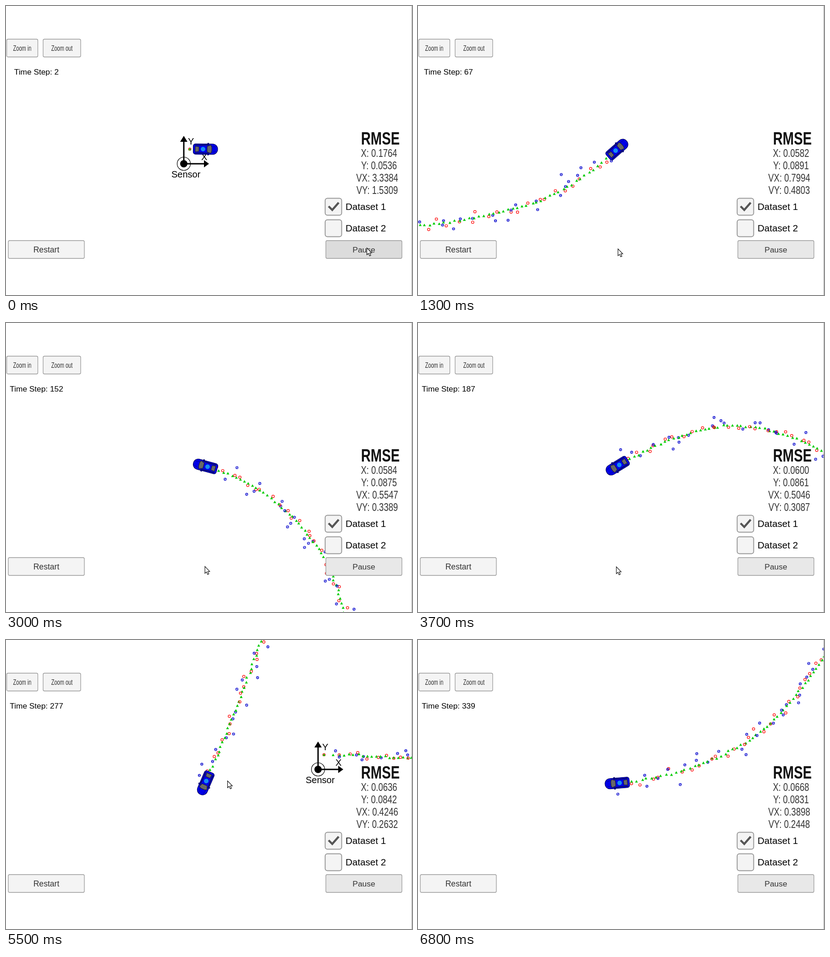
Animation of 886 by 632 pixels, one loop 6.9 s. Source, as an HTML page with a canvas:

```html
<!DOCTYPE html>
<html lang="en">
<head>
<meta charset="utf-8">
<title>Sensor fusion tracking</title>
<style>
html, body { margin: 0; width: 886px; height: 632px; overflow: hidden; background: #fff; }
canvas { display: block; }
</style>
</head>
<body>
<canvas id="stage" width="886" height="632"></canvas>
<script>
const ctx = document.getElementById('stage').getContext('2d');
const FRAMES = 69, FRAME_MS = 100, CENTER = [435, 313];

// Bends of the figure eight: [step, x, y] relative to the sensor.
const path = [
  [0, 13, -32], [2, 47, -32], [24, 265, -28], [44, 478, -67], [56, 595, -118],
  [67, 695, -195], [80, 782, -285], [95, 844, -428], [109, 843, -575], [125, 770, -726],
  [145, 613, -850], [164, 424, -884], [191, 169, -775], [215, 0, -583], [227, -57, -465],
  [246, -123, -280], [277, -246, 30], [287, -294, 121], [306, -420, 271], [323, -572, 353],
  [339, -740, 389], [350, -855, 385]
];
const cursorPath = [
  [0, 787, 529], [7, 600, 588], [10, 436, 531], [51, 431, 534], [55, 483, 308], [61, 640, -30]
];
// [step, X, Y, VX, VY]; errors fall roughly as powers of the step count.
const errors = [
  [2, .1764, .0536, 3.3384, 1.5309], [67, .0582, .0891, .7994, .4803],
  [227, .0613, .0851, .4626, .2840], [339, .0668, .0831, .3898, .2448]
].map(row => row.map(Math.log));

// Cubic interpolation through rows; eased rows come to rest at each key.
function sample(rows, t, eased) {
  const last = rows.length - 1;
  let k = 0;
  while (k < last - 1 && t >= rows[k + 1][0]) k++;
  const a = rows[k], b = rows[k + 1], span = b[0] - a[0];
  const u = Math.min(1, Math.max(0, (t - a[0]) / span));
  const slope = (i, c) => {
    const p = rows[Math.max(0, i - 1)], n = rows[Math.min(last, i + 1)];
    return eased ? 0 : (n[c] - p[c]) / (n[0] - p[0]) * span;
  };
  const rest = u * u * (3 - 2 * u);
  return a.slice(1).map((v, i) => v + (b[i + 1] - v) * rest
    + slope(k, i + 1) * u * (1 - u) ** 2 - slope(k + 1, i + 1) * u * u * (1 - u));
}

function heading(step) {
  const [x0, y0] = sample(path, step - 3), [x1, y1] = sample(path, step + 3);
  return Math.atan2(y1 - y0, x1 - x0);
}

let seed = 41;
function random() {
  seed = (seed * 1664525 + 1013904223) >>> 0;
  return (seed + 1) / 4294967297;
}
const gauss = s => s * Math.sqrt(-2 * Math.log(random())) * Math.cos(2 * Math.PI * random());

// Laser and radar readings alternate; every step also leaves an estimate.
const marks = Array.from({ length: 340 }, (_, i) => {
  const [x, y] = sample(path, i);
  const wobble = Math.min(i, 1.2);
  const estimate = [x + gauss(wobble), y + gauss(wobble)];
  if (i % 2 === 0) {
    const spread = Math.min(i, 5.5);
    return { estimate, reading: [x + gauss(spread), y + gauss(spread)] };
  }
  const range = Math.hypot(x, y) + gauss(14), angle = Math.atan2(y, x) + gauss(.024);
  return { estimate, angle, reading: [range * Math.cos(angle), range * Math.sin(angle)] };
});

function paint(fill, stroke, width = 1) {
  if (fill) { ctx.fillStyle = fill; ctx.fill(); }
  if (stroke) { ctx.strokeStyle = stroke; ctx.lineWidth = width; ctx.stroke(); }
}
function poly(points, fill, ...stroke) {
  ctx.beginPath();
  points.forEach(p => ctx.lineTo(...p));
  if (fill) ctx.closePath();
  paint(fill, ...stroke);
}
function circle(x, y, r, ...style) {
  ctx.beginPath();
  ctx.arc(x, y, r, 0, 7);
  paint(...style);
}
function box(x, y, w, h, r, ...style) {
  ctx.beginPath();
  ctx.roundRect(x, y, w, h, r);
  paint(...style);
}
function text(str, x, y, size, { align = 'center', color = '#000', squeeze = 1, weight = '' } = {}) {
  ctx.save();
  ctx.translate(x, y);
  ctx.scale(squeeze, 1);
  ctx.font = `${weight} ${size}px "Liberation Sans", Arial, sans-serif`;
  ctx.textAlign = align;
  ctx.fillStyle = color;
  ctx.fillText(str, 0, 0);
  ctx.restore();
}

function drawSensor() {
  const black = '#000', left = { align: 'left' };
  circle(0, 0, 14.5, null, black, 1.2);
  poly([[0, -50], [0, 0], [46, 0]], null, black, 3);
  poly([[0, -61], [8, -48], [-8, -48]], black);
  poly([[55, 0], [44, -8], [44, 8]], black);
  circle(0, 0, 8, black);
  text('Y', 9, -42, 20, left);
  text('X', 38, -8, 20, left);
  text('Sensor', -27, 30, 20, left);
}

function drawMark({ estimate: [ex, ey], reading: [x, y], angle }) {
  if (angle === undefined) {
    circle(x, y, 2.7, null, '#f00', 1.2);
  } else {
    const dx = 2 * Math.cos(angle), dy = 2 * Math.sin(angle);
    circle(x, y, 2.5, null, '#00c', 1.2);
    poly([[x - dx, y - dy], [x + dx, y + dy]], null, '#00c');
  }
  poly([[ex, ey - 3], [ex + 3.1, ey + 2.6], [ex - 3.1, ey + 2.6]], '#0c0');
}

function drawCar(angle) {
  const glass = ['#686868', '#222'];
  ctx.save();
  ctx.translate(...CENTER);
  ctx.rotate(angle);
  for (const side of [-1, 1]) {
    poly([[4, side * 11], [5, side * 14], [8, side * 13], [8, side * 11]], '#00007a');
  }
  box(-26.5, -11.5, 53.5, 23, [5, 11, 11, 5], '#0000e6', '#000050');
  for (const side of [-1, 1]) {
    poly([[-23, side * 9], [-10, side * 8.5], [8, side * 9.5]], null, '#101030', 1.5);
    poly([[14, side * 7], [24, side * 5]], null, '#00009a');
  }
  poly([[4, -6], [12, -9], [14, -4], [14, 4], [12, 9], [4, 6]], ...glass);
  poly([[-22, -6], [-14, -5], [-14, 5], [-22, 6]], ...glass);
  circle(-5, 0, 5, '#168cf0');
  ctx.restore();
}

function drawButton(label, x, y, w, size, squeeze = 1, fill = '#f4f4f4') {
  box(x + .5, y + .5, w - 1, 39, 3, fill, '#999', 1.3);
  text(label, x + w / 2, y + 20 + size * .36, size, { color: '#333', squeeze });
}

function drawPanel(step, pressed) {
  drawButton('Zoom in', 1, 72, 69, 16, .69);
  drawButton('Zoom out', 80.5, 72, 83, 16, .69);
  drawButton('Restart', 4.5, 512.5, 167, 17.6);
  drawButton('Pause', 697.5, 512.5, 167, 17.4, 1, pressed ? '#dcdcdc' : '#e8e8e8');
  text('Time Step: ' + step, 66.5, 150, 17.3);

  for (const i of [0, 1]) {
    const y = 420 + 47 * i;
    box(696.5, y + .5, 36, 37, 5, '#f4f4f4', '#999', 2);
    text('Dataset ' + (i + 1), 741, y + 25.5, 20.6, { align: 'left' });
  }
  poly([[704, 438], [712, 446], [726, 430]], null, '#555', 4.5);

  text('RMSE', 817, 303, 38, { weight: 'bold', squeeze: .77, color: '#111' });
  const values = sample(errors, Math.log(step)).map(Math.exp);
  ['X', 'Y', 'VX', 'VY'].forEach((name, i) => {
    text(`${name}: ${values[i].toFixed(4)}`, i < 2 ? 814 : 810, 330 + 27 * i, 24,
      { squeeze: .77, color: '#333' });
  });
  box(885, 0, 1, 632, 0, '#aaa');
}

function drawCursor(frame) {
  const [x, y] = sample(cursorPath, frame, true);
  const outline = [[0, 0], [0, 15], [3.5, 12], [6, 17.5], [8.6, 16.3], [6.2, 11], [10.5, 11]];
  poly(outline.map(([dx, dy]) => [x + dx + .5, y + dy]), '#fff', '#000', 1.1);
}

function draw(now) {
  const frame = Math.floor(now / FRAME_MS) % FRAMES;
  const step = 2 + 5 * frame - Math.round(Math.max(0, frame - 55) * 3 / 13);
  const [x, y] = sample(path, step);
  ctx.fillStyle = '#fff';
  ctx.fillRect(0, 0, 886, 632);
  ctx.save();
  ctx.translate(CENTER[0] - x, CENTER[1] - y);
  drawSensor();
  marks.slice(0, step).forEach(drawMark);
  ctx.restore();
  drawCar(heading(step));
  drawPanel(step, frame < 5);
  drawCursor(frame);
}

const start = performance.now();
function tick() {
  draw(performance.now() - start);
  requestAnimationFrame(tick);
}
tick();
</script>
</body>
</html>
```
